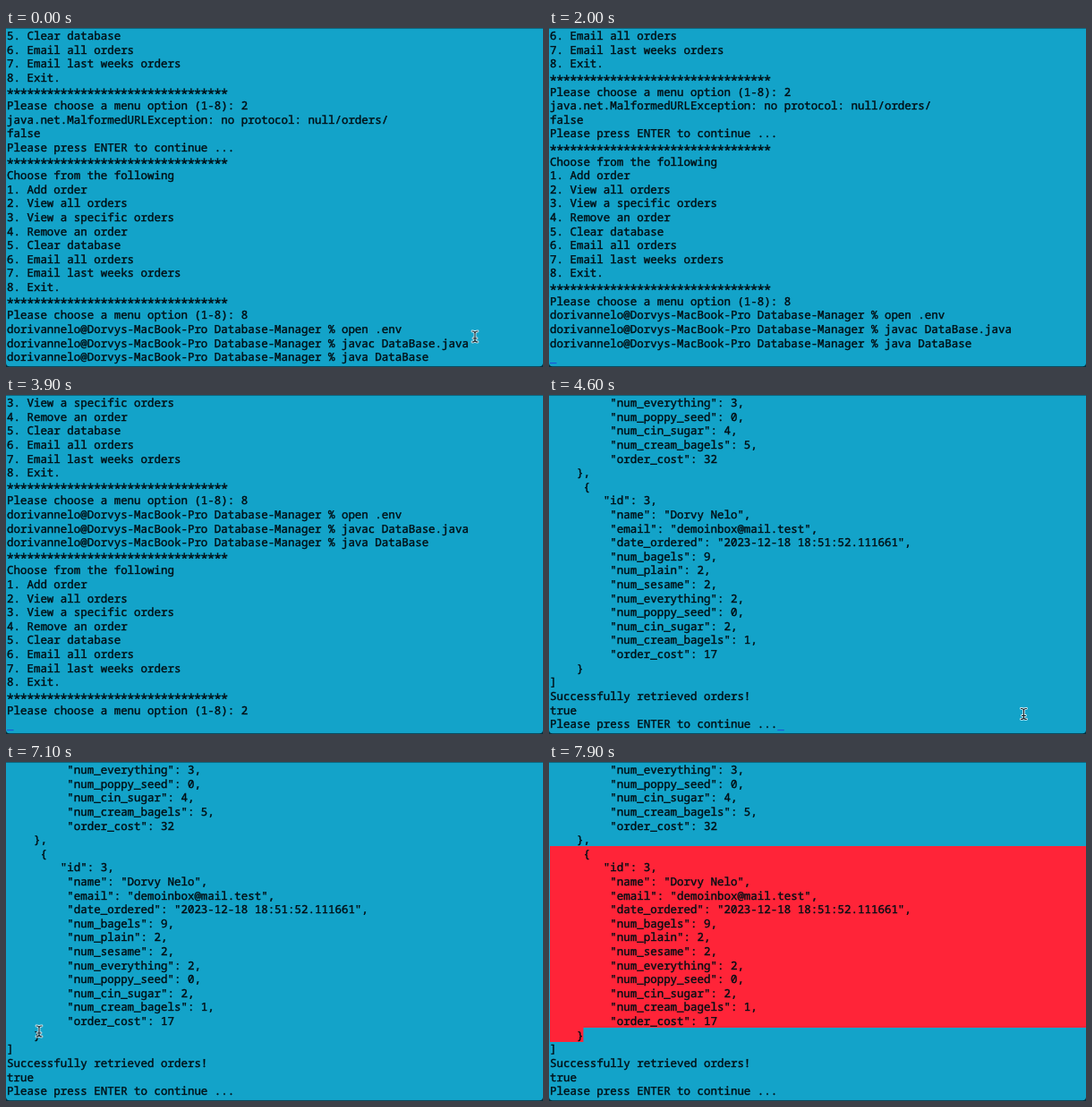
An HTML page with a canvas for the animation above (8000 ms loop, 600 by 379 pixels).

```html
<!DOCTYPE html>
<html lang="en">
<head>
<meta charset="utf-8">
<title>Terminal order manager</title>
<style>
  html, body { margin: 0; width: 100%; height: 100%; overflow: hidden; background: #13a3c9; }
  canvas { display: block; width: 600px; height: 379px; }
</style>
</head>
<body>
<canvas id="screen"></canvas>
<script>
const W = 600, H = 379, LOOP = 8000, TICK = 100;
const CELL = 7.478, LINE = 15.61, LEFT = 1, TOP = 0.8, ROWS = 24;
const INK = '#020e14', PAPER = '#13a3c9', MARK = '#ff2438', CURSOR = '#1d54d4';
const FONT = '"Noto Sans Mono", "DejaVu Sans Mono", monospace';

const canvas = document.getElementById('screen');
const ctx = canvas.getContext('2d');
const ratio = window.devicePixelRatio || 1;
canvas.width = W * ratio;
canvas.height = H * ratio;
ctx.scale(ratio, ratio);

// Terminal contents
const stars = '*'.repeat(33);
const items = ['Add order', 'View all orders', 'View a specific orders', 'Remove an order',
  'Clear database', 'Email all orders', 'Email last weeks orders', 'Exit.']
  .map((label, i) => `${i + 1}. ${label}`);
const ask = 'Please choose a menu option (1-8): ';
const wait = 'Please press ENTER to continue ...';
const menu = [stars, 'Choose from the following', ...items, stars];
const shell = command => 'dorivannelo@Dorvys-MacBook-Pro Database-Manager % ' + command;
const field = (key, value) => ' '.repeat(9) + `"${key}": ${value}`;

const start = [
  ...items.slice(4), stars, ask + '2',
  'java.net.MalformedURLException: no protocol: null/orders/', 'false', wait,
  ...menu, ask + '8',
  shell('open .env'), shell('javac DataBase.java'), shell('java DataBase')
];
const running = [...start, ...menu];
const orders = [
  field('num_everything', '3,'), field('num_poppy_seed', '0,'), field('num_cin_sugar', '4,'),
  field('num_cream_bagels', '5,'), field('order_cost', '32'),
  '    },', '     {', '        "id": 3,',
  field('name', '"Dorvy Nelo",'), field('email', '"demoinbox@mail.test",'),
  field('date_ordered', '"2023-12-18 18:51:52.111661",'),
  field('num_bagels', '9,'), field('num_plain', '2,'), field('num_sesame', '2,'),
  field('num_everything', '2,'), field('num_poppy_seed', '0,'), field('num_cin_sugar', '2,'),
  field('num_cream_bagels', '1,'), field('order_cost', '17'),
  '    }', ']', 'Successfully retrieved orders!', 'true', wait
];

const screens = [
  { at: -LOOP, lines: start },
  { at: 1900, lines: [...start, ''] },
  { at: 2400, lines: [...running, ask] },
  { at: 3400, lines: [...running, ask + '2'] },
  { at: 3900, lines: [...running, ask + '2', ''] },
  { at: 4300, lines: orders }
];

const enter = 1900;
const rest = { x: 490, y: 360 }, grab = { x: 37, y: 301 };
const glides = [
  { begin: 4300, end: 5200, from: { x: 581, y: 352 }, to: rest },
  { begin: 5900, end: 7000, from: rest, to: grab },
  { begin: 7200, end: 7700, from: grab, to: { x: LEFT, y: 102 } }
];
const drag = glides[2];

const clamp = v => Math.min(1, Math.max(0, v));
const easeOut = k => 1 - (1 - k) ** 2;
const rowTop = row => TOP + row * LINE;
const colLeft = col => LEFT + col * CELL;

function pointerAt(t) {
  if (t < enter) return { x: 524, y: 345 };
  const glide = glides.filter(g => g.begin <= t).pop();
  if (!glide) return null;
  const { begin, end, from, to } = glide;
  const k = easeOut(clamp((t - begin) / (end - begin)));
  return { x: from.x + (to.x - from.x) * k, y: from.y + (to.y - from.y) * k };
}

// Everything between the pointer cell and the closing brace
function drawSelection(t) {
  if (t <= drag.begin) return;
  const { x, y } = pointerAt(t);
  const first = Math.floor((y - TOP) / LINE);
  const last = orders.indexOf('    }');
  ctx.fillStyle = MARK;
  for (let row = first; row <= last; row++) {
    const left = row === first ? colLeft(Math.round((x - LEFT) / CELL)) : LEFT;
    const right = row === last ? colLeft(orders[last].length) : W;
    const top = Math.round(rowTop(row));
    ctx.fillRect(left, top, Math.max(0, right - left), Math.round(rowTop(row + 1)) - top);
  }
}

function drawGlyph(ch, col, row) {
  const star = ch === '*';
  const x = colLeft(col + .5), y = rowTop(row) + (star ? 15.9 : 12.3);
  ctx.font = `500 ${star ? 15 : 12.46}px ${FONT}`;
  ctx.fillText(ch, x, y);
  ctx.strokeText(ch, x, y);
}

function drawText(lines) {
  ctx.textRendering = 'geometricPrecision';
  ctx.textAlign = 'center';
  ctx.fillStyle = ctx.strokeStyle = INK;
  ctx.lineWidth = .4;
  lines.forEach((line, row) =>
    [...line].forEach((ch, col) => ch !== ' ' && drawGlyph(ch, col, row)));
}

// Solid just after output, then a soft blink
function drawCursor(col, t, since) {
  const pulse = clamp(4 * Math.cos((t - 900) / 1200 * 2 * Math.PI) - 2);
  ctx.globalAlpha = since < 500 ? 1 : pulse;
  ctx.fillStyle = CURSOR;
  ctx.fillRect(colLeft(col), 374, CELL, 1.2);
  ctx.globalAlpha = 1;
}

function drawPointer({ x, y }) {
  ctx.beginPath();
  for (const side of [-1, 1]) {
    ctx.moveTo(x + side * 3, y - 6);
    ctx.quadraticCurveTo(x, y - 6, x, y - 4);
    ctx.lineTo(x, y + 4);
    ctx.quadraticCurveTo(x, y + 6, x + side * 3, y + 6);
  }
  ctx.moveTo(x - 2, y + 2);
  ctx.lineTo(x + 2, y + 2);
  ctx.lineCap = 'round';
  for (const [color, width] of [['#d5edf4', 2.8], ['#10242c', 1.1]]) {
    ctx.strokeStyle = color;
    ctx.lineWidth = width;
    ctx.stroke();
  }
}

function drawWindow() {
  ctx.fillStyle = '#06303e';
  ctx.fillRect(0, 0, W, H);
  ctx.fillStyle = PAPER;
  ctx.beginPath();
  ctx.roundRect(0, .4, W, H - 1.2, [0, 0, 4, 4]);
  ctx.fill();
}

function draw(t) {
  const { at, lines } = screens.filter(s => s.at <= t).pop();
  const visible = lines.slice(-ROWS);
  const pointer = pointerAt(t);
  drawWindow();
  drawSelection(t);
  drawText(visible);
  drawCursor(visible[ROWS - 1].length, t, t - at);
  if (pointer && t < drag.end) drawPointer(pointer);
}

let origin = null, shown = 0;
function frame(now) {
  origin ??= now;
  const t = Math.floor(((now - origin) % LOOP) / TICK) * TICK;
  if (t !== shown) draw(shown = t);
  requestAnimationFrame(frame);
}
draw(0);
requestAnimationFrame(frame);
</script>
</body>
</html>
```
